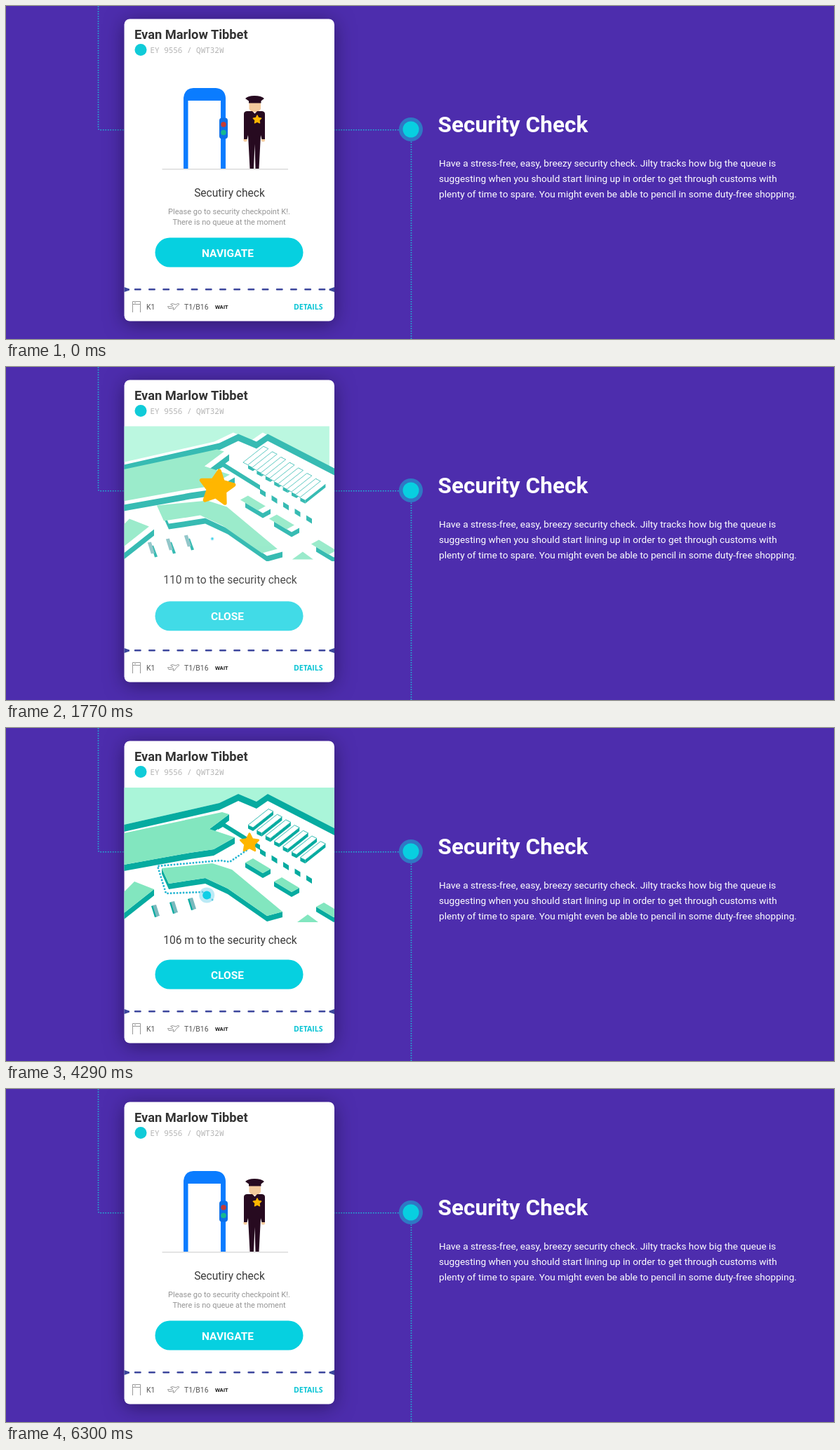
An HTML page for the animation above (6360 ms loop, 1180 by 475 pixels).

```html
<!DOCTYPE html>
<html lang="en">
<head>
<meta charset="utf-8">
<title>Security Check</title>
<style>
  html, body { margin: 0; width: 100%; height: 100%; overflow: hidden; background: #4d2dad; }
  svg { display: block; width: 1180px; height: 475px; font-family: Roboto, "Open Sans", sans-serif; }
  .card { filter: drop-shadow(0 4px 14px rgba(22, 8, 50, .55)); }
  .dots { fill: none; stroke: #20b8d6; stroke-width: 1.6; stroke-dasharray: 1.6 1.9; }
  .body { font-size: 13.65px; fill: #fff; }
  .mid { text-anchor: middle; }
  .title { font-size: 15.57px; fill: #3c3c3c; }
  .note { font-size: 11px; fill: #959595; }
  .label { font-size: 15.5px; font-weight: 700; fill: #fff; }
  .foot { font-size: 10.4px; fill: #555; }
  .icon { fill: none; stroke: #999; stroke-linejoin: round; }
  .wall { fill: #06aba0; }
  .top { fill: #82e6bf; }
  .light { fill: #aaf5d9; }
  .seat { fill: #fff; stroke: #06aba0; stroke-width: .8; }
  .post { fill: #79b9bd; }
  #route { fill: none; stroke: #22b5d2; stroke-width: 2.9; stroke-linecap: round; stroke-dasharray: 0 4.5; }
</style>
</head>
<body>
<svg viewBox="0 0 1180 475">
  <defs>
    <clipPath id="mapClip"><rect x="168.5" y="84" width="299.5" height="193"/></clipPath>
  </defs>
  <rect width="1180" height="475" fill="#4d2dad"/>

  <path class="dots" d="M131.5 0V174Q131.5 176.8 134.5 176.8H562M577.5 190V475"/>
  <circle cx="577" cy="176" r="17" fill="#2f78c4"/>
  <circle cx="577" cy="176" r="11.5" fill="#08cfe0"/>
  <text x="615.5" y="180" font-size="31.6" font-weight="700" fill="#fff">Security Check</text>
  <g class="body">
    <text x="617" y="229">Have a stress-free, easy, breezy security check. Jilty tracks how big the queue is</text>
    <text x="617" y="251">suggesting when you should start lining up in order to get through customs with</text>
    <text x="617" y="273">plenty of time to spare. You might even be able to pencil in some duty-free shopping.</text>
  </g>

  <rect class="card" x="168.5" y="18.5" width="299.5" height="431" rx="8" fill="#fff"/>
  <text x="183" y="46.5" font-size="18.3" font-weight="700" fill="#333">Evan Marlow Tibbet</text>
  <circle cx="192" cy="62.5" r="8.5" fill="#10cbd8"/>
  <text x="205.5" y="66.5" font-size="10.95" fill="#b3b3b3" font-family="'Noto Sans Mono', 'DejaVu Sans Mono', monospace">EY 9556 / QWT32W</text>

  <g id="map" clip-path="url(#mapClip)">
    <g id="ground"></g>
    <g id="walls"></g>
    <g id="tops"></g>
    <path id="route"/>
    <g id="marker">
      <circle r="11" fill="#8edcf0" fill-opacity=".6"/>
      <circle r="6" fill="#10cfe6"/>
    </g>
  </g>
  <text id="distance" class="mid title" x="319.5" y="307.5"></text>
  <g id="close">
    <rect x="212.5" y="330.5" width="211" height="42" rx="21" fill="#06d0e0"/>
    <text class="mid label" x="315.5" y="357.5">CLOSE</text>
  </g>

  <path id="floor" d="M222.5 232.8H402" stroke="#dcdcdc" stroke-width="1.6"/>
  <g id="check">
    <path fill="#0a7cff" d="M253 232V131Q254 118 267 117H299Q312 118 313 131V232H306V135H259.5V232Z"/>
    <rect x="304" y="159.5" width="12" height="30" rx="4" fill="#0b6fe8"/>
    <circle cx="310" cy="169" r="3.8" fill="#c33b36"/>
    <circle cx="310" cy="180.5" r="3.8" fill="#14b890"/>
    <g fill="#f3ca9c">
      <path d="M346.5 136H363V147L359 151.5H350.5L346.5 147Z"/>
      <circle cx="341" cy="191" r="2.6"/>
      <circle cx="366.5" cy="191" r="2.6"/>
    </g>
    <g fill="#270a20">
      <path d="M341 132Q345 128 354 128Q364 128 368 132L363.5 135.5V138.5H346V135.5Z"/>
      <path d="M339 154Q339 150.5 343 150H351L354.5 153.5L358 150H365Q369 150.5 369 154V190H364.5L363 184L360.5 232H355.5L354.5 197L353 232H347.5L345 184L343.5 190H339Z"/>
    </g>
  </g>
  <text id="heading" class="mid title" x="318.5" y="272">Secutiry check</text>
  <g id="note" class="mid note">
    <text x="318" y="297">Please go to security checkpoint K!.</text>
    <text x="318" y="312">There is no queue at the moment</text>
  </g>
  <g id="navigate">
    <rect x="212.5" y="330.5" width="211" height="42" rx="21" fill="#06d0e0"/>
    <text class="mid label" x="316" y="357.5">NAVIGATE</text>
  </g>
  <path id="star" fill="#ffb600" stroke="#ffb600" stroke-width=".2" stroke-linejoin="round"/>

  <path d="M184 404.3H455" stroke="#3d479d" stroke-width="2.5" stroke-linecap="round" stroke-dasharray="7.5 12.7"/>
  <path d="M168.5 401L176 403.5V405.5L168.5 408ZM468 401L460.5 403.5V405.5L468 408Z" fill="#3d479d"/>
  <path class="icon" d="M180.5 437V421.5H191.5V437M180.5 425.5H191.5M183 423.5H185"/>
  <path class="icon" d="M230.5 428.5L235 429L238 427.5L234.5 425.5L237 424.5L242 426L245 424.5Q247.5 424.5 246.5 426L243 428.5L240 433H238L239 430L235 431.5H232Z"/>
  <text class="foot" x="200" y="433">K1</text>
  <text class="foot" x="254" y="433">T1/B16</text>
  <text x="298" y="431.5" font-size="7.4" font-weight="700" fill="#111" font-family="'Liberation Sans', Arial, sans-serif">WAIT</text>
  <text x="410" y="433" font-size="10.5" font-weight="700" fill="#08c4d4" font-family="'Open Sans', 'Noto Sans', sans-serif">DETAILS</text>
</svg>

<script>
const LOOP = 6360;
const el = id => document.getElementById(id);
const move = (id, transform) => el(id).setAttribute('transform', transform);
const fade = (id, opacity) => el(id).setAttribute('opacity', opacity);
const mix = (a, b, u) => a + (b - a) * u;
const span = (t, start, length) => Math.min(1, Math.max(0, (t - start) / length));
const easeIn = u => u * u;
const easeOut = u => 1 - (1 - u) ** 3;

// --- Map: outlines run clockwise, so edges going left face the viewer ---
const points = text => text.split(' ').map(pair => pair.split(',').map(Number));

function add(layer, cls, list) {
  el(layer).insertAdjacentHTML('beforeend', '');
  const shape = document.createElementNS('http://www.w3.org/2000/svg', 'polygon');
  shape.setAttribute('class', cls);
  shape.setAttribute('points', list.join(' '));
  el(layer).append(shape);
}

function wall(list, height) {
  for (let i = 1; i < list.length; i++) {
    const [ax, ay] = list[i - 1], [bx, by] = list[i];
    if (bx < ax) add('walls', 'wall', [[ax, ay], [bx, by], [bx, by + height], [ax, ay + height]]);
  }
}

function block(list, height, cls = 'top') {
  wall([...list, list[0]], height);
  add('tops', cls, list);
}

// Slab with a corner at x, y and two edge vectors
function slab(x, y, [ux, uy], [vx, vy], height, cls) {
  block([[x, y], [x + ux, y + uy], [x + ux + vx, y + uy + vy], [x + vx, y + vy]], height, cls);
}

function buildMap() {
  const roof = points('468,143 373,94 357,105 331,94 304,107 168,138');
  add('ground', 'light', [[168, 85], [468, 85], ...roof]);
  wall(roof, 10);
  wall(points('362,167 309,134 302,138'), 7);
  block(points('168,150 308,120 318,123 290,144 326,156 296,173 262,178 168,195'), 9);
  block(points('222,200 294,193 322,202 394,262 372,268 316,229 284,214 232,222'), 8);
  block(points('168,234 183,219 211,230 168,264'), 9);
  block(points('415,277 430,266 445,277'), 0);

  for (const [x, y] of points('341,192 382,219 442,255')) slab(x, y, [11, -6], [25, 15], 7);
  for (let i = 0; i < 7; i++) {
    slab(345 + 12.4 * i, 138.5 + 7.7 * i, [29, -23], [7, 3.5], 5, 'seat');
  }
  for (let i = 0; i < 5; i++) {
    const x = 362 + 16.5 * i, y = 172 + 9.5 * i;
    wall([[x + 8, y + 5], [x, y]], 7);
  }
  for (let i = 0; i < 3; i++) {
    const x = 207 + 26 * i, y = 254 - 5 * i;
    add('walls', 'wall', [[x, y], [x + 3, y - 1], [x + 9, y + 15], [x + 5, y + 16]]);
    add('tops', 'post', [[x + 2, y - 1], [x + 7, y - 2], [x + 12, y + 14], [x + 7, y + 15]]);
  }
}

const stops = points('294,245 281,234 228,236 216,197 305,189 319,191 345,173');

// First part of the route, with its end point
function routeTo(length) {
  let [x, y] = stops[0], d = `M${x} ${y}`;
  for (const [nx, ny] of stops.slice(1)) {
    const step = Math.hypot(nx - x, ny - y), u = Math.min(1, length / step);
    x = mix(x, nx, u);
    y = mix(y, ny, u);
    d += `L${x} ${y}`;
    length -= step;
    if (length <= 0) break;
  }
  return { d, x, y };
}

function drawMap(t) {
  const away = t < 3000 ? 1 - easeOut(span(t, 1600, 410)) : easeIn(span(t, 4450, 450));
  fade('map', 1 - away);
  move('ground', `translate(${-36 * away} ${-3 * away})`);
  move('walls', `translate(0 ${8 * away})`);
  move('tops', `translate(${-36 * away} ${-12 * away})`);

  const drawn = 247 * span(t, 1860, 445) * (1 - .75 * span(t, 4450, 250));
  el('route').setAttribute('d', routeTo(drawn).d);

  const metres = 5 * span(t, 2500, 1960);
  const spot = routeTo(metres * 2.24);
  const size = easeOut(span(t, 1750, 250)) * (1 - span(t, 4450, 220));
  move('marker', `translate(${spot.x} ${spot.y}) scale(${size})`);
  el('distance').textContent = `${Math.ceil(110 - metres)} m to the security check`;
}

// --- Star: flies from the badge to full size, to the map pin, and back ---
const badge = { x: 358, y: 162, r: 7 };
const pin = { x: 347, y: 164, r: 15.3 };
const full = { x: 314, y: 242, r: 57.5 };
const flights = [
  { start: 780, length: 700, from: badge, to: full },
  { start: 1570, length: 620, from: full, to: pin },
  { start: 4420, length: 530, from: pin, to: full },
  { start: 5030, length: 510, from: full, to: badge }
];

function starPath() {
  let d = '';
  for (let i = 0; i < 10; i++) {
    const r = i % 2 ? .43 : .86, a = i * Math.PI / 5;
    d += `${i ? 'L' : 'M'}${r * Math.sin(a)} ${-r * Math.cos(a)}`;
  }
  return d + 'Z';
}

function drawStar(t) {
  const { start, length, from, to } = flights.findLast(f => t >= f.start) || flights[0];
  const u = (to === full ? easeIn : easeOut)(span(t, start, length));
  const bow = Math.sin(Math.PI * u);
  const x = mix(from.x, to.x, u) - 44 * bow;
  const y = mix(from.y, to.y, u) - 19 * bow;
  const swing = 12 * Math.sin(Math.PI * span(t, 2000, 500));
  const turn = -72 * Math.sin(Math.PI / 2 * u) - swing;
  move('star', `translate(${x} ${y}) rotate(${turn}) scale(${mix(from.r, to.r, u)})`);
}

// --- Checkpoint scene, captions and buttons ---
function drawCheck(t) {
  const s = t < 3000 ? 1 - easeIn(span(t, 850, 420)) : easeOut(span(t, 5290, 500));
  move('check', `translate(317.5 177) scale(${s}) translate(-317.5 -177)`);
  move('floor', `translate(0 ${10 * (1 - s)})`);
  fade('floor', s);
}

// Rises into place while fading in, drops while fading out
function slide(id, shown, gone, rise, drop) {
  move(id, `translate(0 ${rise * (1 - shown) + drop * gone})`);
  fade(id, shown * (1 - gone));
}

function drawCaptions(t) {
  ['navigate', 'note', 'heading'].forEach((id, i) => {
    const back = easeOut(span(t, 5500 - 50 * i, 400));
    const gone = easeIn(span(t, 700 + 50 * i, 330));
    if (t < 3000) slide(id, 1, gone, 0, 18);
    else slide(id, back, 0, 18, 0);
  });
  ['distance', 'close'].forEach((id, i) => {
    const shown = easeOut(span(t, 1520 + 80 * i, 450));
    slide(id, shown, easeIn(span(t, 4450 - 50 * i, 328)), 16, 26);
  });
}

buildMap();
el('star').setAttribute('d', starPath());
const begin = performance.now();
function tick() {
  const t = (performance.now() - begin) % LOOP;
  drawMap(t);
  drawCheck(t);
  drawCaptions(t);
  drawStar(t);
  requestAnimationFrame(tick);
}
tick();
</script>
</body>
</html>
```
